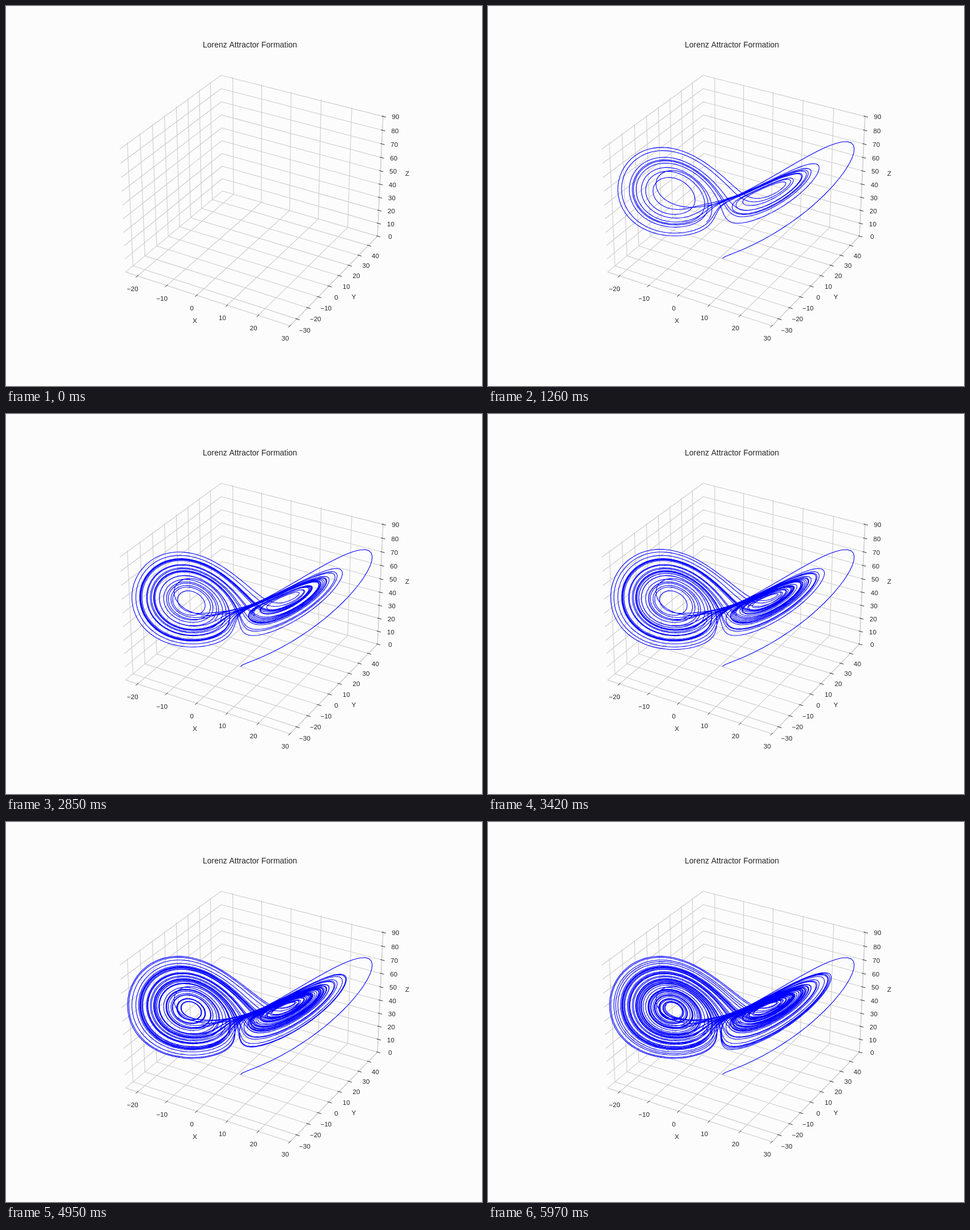
These frames come from a looping animation (837 by 669 pixels, 6 s). An HTML page with a canvas:

```html
<!DOCTYPE html>
<html lang="en">
<head>
<meta charset="utf-8">
<title>Lorenz Attractor Formation</title>
<style>
  html, body { margin: 0; width: 837px; height: 669px; overflow: hidden; background: #fcfcfc; }
  canvas { display: block; }
</style>
</head>
<body>
<canvas id="stage" width="837" height="669"></canvas>
<script>
const W = 837, H = 669, LOOP = 6000, TICK = 30;
const FRAMES = LOOP / TICK, POINTS_PER_FRAME = 50, TIME_SPAN = 50;
const SIGMA = 10, RHO = 50, BETA = 8 / 3;

const canvas = document.getElementById('stage');
const ctx = canvas.getContext('2d');

const slope = ([x, y, z]) => [SIGMA * (y - x), x * (RHO - z) - y, x * y - BETA * z];

// Adaptive Dormand-Prince 5(4) with its dense output
const STAGES = [
  [1 / 5],
  [3 / 40, 9 / 40],
  [44 / 45, -56 / 15, 32 / 9],
  [19372 / 6561, -25360 / 2187, 64448 / 6561, -212 / 729],
  [9017 / 3168, -355 / 33, 46732 / 5247, 49 / 176, -5103 / 18656],
  [35 / 384, 0, 500 / 1113, 125 / 192, -2187 / 6784, 11 / 84]
];
const ERROR = [-71 / 57600, 0, 71 / 16695, -71 / 1920, 17253 / 339200, -22 / 525, 1 / 40];
const DENSE = [-12715105075 / 11282082432, 0, 87487479700 / 32700410799,
  -10690763975 / 1880347072, 701980252875 / 199316789632,
  -1453857185 / 822651844, 69997945 / 29380423];
const RTOL = 1e-3, ATOL = 1e-6;

const mix = (weights, ks) => [0, 1, 2].map(i => weights.reduce((s, w, j) => s + w * ks[j][i], 0));
const add = (p, d, h) => p.map((v, i) => v + d[i] * h);
const norm = (v, scale) => Math.hypot(...v.map((q, i) => q / scale[i])) / Math.sqrt(3);
const tolerance = (p, q) => p.map((v, i) => ATOL + RTOL * Math.max(Math.abs(v), Math.abs(q[i])));

function firstStep(p) {
  const f = slope(p), scale = tolerance(p, p);
  const d1 = norm(f, scale), h = 0.01 * norm(p, scale) / d1;
  const d2 = norm(add(slope(add(p, f, h)), f, -1), scale) / h;
  return Math.min(100 * h, (0.01 / Math.max(d1, d2)) ** 0.2);
}

function interpolate(p, q, ks, h, u) {
  const dense = mix(DENSE, ks);
  return p.map((v, i) => {
    const d = q[i] - v, bend = h * ks[0][i] - d;
    const tail = d - h * ks[6][i] - bend + (1 - u) * h * dense[i];
    return v + u * (d + (1 - u) * (bend + u * tail));
  });
}

function integrate(p, count, span) {
  const points = [p], gap = span / (count - 1);
  let t = 0, h = firstStep(p), rejected = false;
  while (points.length < count) {
    const ks = [slope(p)];
    let q;
    for (const row of STAGES) {
      q = add(p, mix(row, ks), h);
      ks.push(slope(q));
    }
    const error = norm(mix(ERROR, ks), tolerance(p, q)) * h;
    const factor = 0.9 * error ** -0.2;
    if (error >= 1) {
      h *= Math.max(0.2, factor);
      rejected = true;
      continue;
    }
    while (points.length < count && points.length * gap <= t + h) {
      points.push(interpolate(p, q, ks, h, (points.length * gap - t) / h));
    }
    t += h;
    h *= Math.min(rejected ? 1 : 10, factor);
    rejected = false;
    p = q;
  }
  return points;
}

const orbit = integrate([1, 0, 0], FRAMES * POINTS_PER_FRAME, TIME_SPAN);

// Axis limits: the first swing sets every maximum
const low = [-24.1, -36, 0];
const high = low.map((_, i) => Math.max(...orbit.map(p => p[i])));
const span = high.map((v, i) => v - low[i]);

// Perspective view: elevation 30, azimuth -60, distance 10
const BOX = [25 / 21, 25 / 21, 25 / 28], DIST = 10;
const SCALE = 0.77 * H / 0.185;
const CX = 0.5125 * W + 0.0025 * SCALE, CY = 0.505 * H - 0.0025 * SCALE;
const C30 = Math.sqrt(3) / 2;

function project(p) {
  const [x, y, z] = p.map((v, i) => ((v - low[i]) / span[i] - 0.5) * BOX[i]);
  const k = SCALE / (DIST - (C30 / 2 * x - 0.75 * y + 0.5 * z));
  return [CX + k * (C30 * x + 0.5 * y), CY - k * (-0.25 * x + C30 / 2 * y + C30 * z)];
}

function polyline(c, points, color, width) {
  c.beginPath();
  for (const [x, y] of points) c.lineTo(x, y);
  c.strokeStyle = color;
  c.lineWidth = width;
  c.lineJoin = 'round';
  c.stroke();
}

function label(c, text, x, y, size = 11.6) {
  c.font = `${size}px "Liberation Sans", Arial, sans-serif`;
  c.textAlign = 'center';
  c.fillStyle = '#262626';
  c.fillText(text, x, y + size * 0.36);
}

function drawAxes(c) {
  const [x0, y0, z0] = low, [x1, y1, z1] = high;
  const grid = (...pts) => polyline(c, pts.map(project), '#ccc', 1.1);
  const axes = [
    { from: -20, to: 30, out: 1, sign: -1, shift: () => [-8.5, 22.5],
      edge: v => [v, y0, z0], wall: v => [[v, y0, z0], [v, y1, z0], [v, y1, z1]] },
    { from: -30, to: 40, out: 0, sign: 1, shift: v => [13.2 - v / 40, 19.2 - v / 35],
      edge: v => [x1, v, z0], wall: v => [[x1, v, z0], [x0, v, z0], [x0, v, z1]] },
    { from: 0, to: 90, out: 0, sign: 1, shift: () => [22, 0.8],
      edge: v => [x1, y1, v], wall: v => [[x0, y0, v], [x0, y1, v], [x1, y1, v]] }
  ];

  axes.forEach(a => {
    for (let v = a.from; v <= a.to; v += 10) grid(...a.wall(v));
  });
  grid([x0, y0, z0], [x1, y0, z0], [x1, y1, z0], [x1, y1, z1]);

  axes.forEach(a => {
    for (let v = a.from; v <= a.to; v += 10) {
      const p = a.edge(v);
      const mark = f => project(p.map((q, i) => i === a.out ? q + a.sign * f * span[i] : q));
      polyline(c, [mark(-1 / 120), mark(1 / 60)], '#262626', 0.95);
      const [x, y] = project(p), [dx, dy] = a.shift(v);
      label(c, String(v).replace('-', '\u2212'), x + dx, y + dy);
    }
  });

  label(c, 'X', 332, 554);
  label(c, 'Y', 611.5, 511.5);
  label(c, 'Z', 705.5, 294.5);
  label(c, 'Lorenz Attractor Formation', 0.5125 * W, 68.4, 13.95);
}

const backdrop = document.createElement('canvas');
backdrop.width = W;
backdrop.height = H;
const back = backdrop.getContext('2d');
back.fillStyle = '#fcfcfc';
back.fillRect(0, 0, W, H);
drawAxes(back);

const trail = orbit.map(project);
const start = performance.now();
let shown = -1;

function draw() {
  const frame = Math.floor((performance.now() - start) % LOOP / TICK);
  if (frame !== shown) {
    shown = frame;
    ctx.drawImage(backdrop, 0, 0);
    polyline(ctx, trail.slice(0, frame * POINTS_PER_FRAME), '#00f', 1.1);
  }
  requestAnimationFrame(draw);
}
draw();
</script>
</body>
</html>
```
